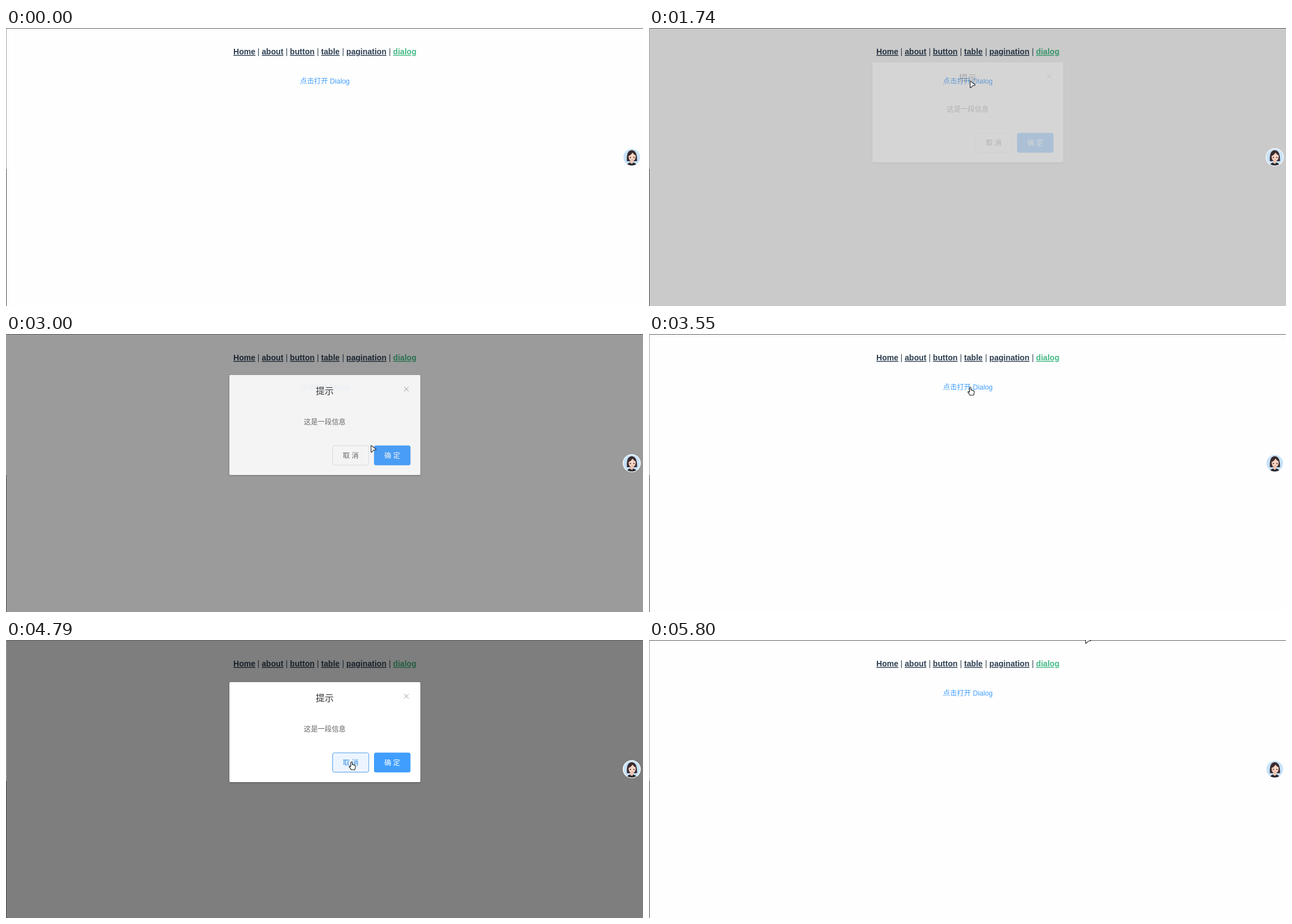
Animation, 1132 px wide and 495 px high, one loop 5900 ms. Source, as an HTML page:

```html
<!DOCTYPE html>
<html lang="zh-CN">
<head>
<meta charset="utf-8">
<title>Dialog</title>
<style>
  html, body { margin: 0; width: 100%; height: 100%; overflow: hidden; background: #fefefe; }
  svg { display: block; width: 1132px; height: 495px; }
  text { font: 12.4px "Liberation Sans", Arial, "Noto Sans CJK SC", "Noto Sans CJK", sans-serif; white-space: pre; }
  .nav text { font-size: 14.1px; fill: #2c3e50; }
  .nav .link { font-weight: bold; text-decoration: underline; }
  .nav .active { fill: #42b983; }
  .mid { text-anchor: middle; }
  .panel { fill: #fff; filter: drop-shadow(0 1px 1.4px rgba(0, 0, 0, .3)); }
  .cursor path { fill: #fff; stroke: #111; stroke-width: 1.1; stroke-linejoin: round; stroke-linecap: round; }
</style>
</head>
<body>
<svg viewBox="0 0 1132 495">
  <rect width="1132" height="495" fill="#fefefe"/>
  <g class="nav" id="nav"></g>
  <text x="522.6" y="99.2" fill="#409eff">点击打开 Dialog</text>

  <rect id="mask" width="1132" height="495" fill="#000" opacity="0"/>

  <g id="dialog" opacity="0">
    <rect class="panel" x="397" y="75" width="339.4" height="178" rx="1.8"/>
    <text class="mid" x="566.5" y="109" style="font-size:15.9px" fill="#303133">提示</text>
    <path d="M707.4 96.1l8.2 8.2m0-8.2l-8.2 8.2" stroke="#909399" stroke-width="1"/>
    <text class="mid" x="566.5" y="162.5" fill="#606266">这是一段信息</text>
    <rect id="cancel" x="580.5" y="200.9" width="64.2" height="34.4" rx="3.2"/>
    <text id="cancelText" class="mid" x="612.6" y="222.6">取 消</text>
    <rect id="confirm" x="654" y="200.5" width="64.8" height="35.2" rx="3.5"/>
    <text class="mid" x="686.4" y="222.6" fill="#fff" font-weight="500">确 定</text>
  </g>

  <g transform="translate(1112 230)">
    <clipPath id="round"><circle r="14.8"/></clipPath>
    <circle r="16" fill="#fff"/>
    <circle r="14.8" fill="#c6e2fa"/>
    <g clip-path="url(#round)">
      <path d="M-8.6 7Q-10-12 0-12.6Q10-12 9.4 7Q5 8 0 6Q-5 8-8.6 7Z" fill="#3b2b2d"/>
      <path d="M-9 16Q-8 10.500-2.500 9.500H2.500Q8 10.500 9 16Z" fill="#24242a"/>
      <path d="M-2.300 5H2.300V10.500Q0 13-2.300 10.500Z" fill="#f0bfa9"/>
      <path d="M-5.600-2Q-1-4 1.500-8Q4-4 7-3Q7.500 6.800.7 7Q-5.800 6.500-5.600-2Z" fill="#f9d5c4"/>
      <circle cx="-2.400" cy="0.600" r="1.100" fill="#3a2528"/>
      <circle cx="3.800" cy="0.600" r="1.100" fill="#3a2528"/>
      <path d="M-.4 4.400Q.8 5.200 2 4.400" fill="none" stroke="#d0655f" stroke-width=".9"/>
    </g>
  </g>

  <rect width="1132" height="1" fill="#5c5c5c"/>
  <rect width="1" height="251" fill="#a0a0a0"/>
  <rect y="251" width="1" height="244" fill="#444"/>

  <g class="cursor" id="cursor">
    <g id="arrow"><path d="M.7 1.400Q.7.2 1.700.9L9.200 6.900Q10 8 8.700 8.300L6.200 8.500Q5.200 8.700 4.500 9.600L2.300 12Q.9 13 .7 11.600Z"/></g>
    <g id="hand"><path d="M-1.400 8.500V1.200Q-1.300 0 0 0Q1.200 0 1.300 1.200V5Q2.500 4.300 3.300 5.300Q4.600 4.800 5.200 6Q6.900 5.800 6.900 7.500V10Q6.800 12 5.500 14H-.6Q-1.600 12-3.900 9.200Q-4.600 7.700-3.300 7.500Q-2.300 7.500-1.400 8.500Z"/></g>
    <g id="beam"><path d="M-2-5H2M0-5V5M-2 5H2" style="fill:none;stroke:#222;stroke-width:1"/></g>
  </g>
</svg>
<script>
const LOOP = 5900;
const $ = id => document.getElementById(id);
const set = (id, attrs) => {
  for (const k in attrs) $(id).setAttribute(k, attrs[k]);
};

const links = [["Home", 404], ["about", 454.5], ["button", 504.6], ["table", 560], ["pagination", 604.8], ["dialog", 687.8]];
const bars = [448.7, 498.8, 554.4, 599, 682];
$("nav").innerHTML =
  links.map(([name, x]) => `<text class="link${name === "dialog" ? " active" : ""}" x="${x}" y="47">${name}</text>`).join("") +
  bars.map(x => `<text class="mid" x="${x}" y="47">|</text>`).join("");

// Screen refreshes: first time, last time, count
const ticks = [0];
[[50, 620, 7], [710, 1270, 7], [1640, 1640, 1], [1740, 2150, 6], [2260, 2620, 5],
 [2900, 2900, 1], [3000, 3470, 6], [3700, 3980, 4], [4070, 4260, 3],
 [4360, 4790, 6], [4870, 4870, 1], [4980, 5540, 7], [5620, 5620, 1], [5800, 5800, 1]]
  .forEach(([from, to, n]) => {
    for (let i = 0; i < n; i++) ticks.push(n > 1 ? from + (to - from) * i / (n - 1) : from);
  });
const hold = t => ticks.reduce((last, tick) => tick <= t + .01 ? tick : last, 0);

// Pointer: time, x, y, shape
const route = [
  [0, 761, -20, "arrow"], [50, 761, -5, "arrow"], [330, 738, 20, "arrow"], [600, 705, 39, "hand"],
  [800, 677, 53, "arrow"], [1100, 592, 90, "hand"], [1270, 570, 94, "hand"], [1690, 570, 94, "arrow"],
  [1740, 570, 94, "arrow"], [2150, 630, 152, "arrow"], [2430, 677, 211, "hand"], [2620, 690, 226, "hand"],
  [2900, 690, 226, "hand"], [3000, 648, 198, "arrow"], [3300, 586, 112, "arrow"], [3340, 580, 103, "hand"],
  [3470, 571, 95, "hand"], [3980, 571, 95, "hand"], [4070, 571.5, 110.5, "beam"], [4150, 573, 118, "arrow"],
  [4550, 607, 204, "hand"], [4700, 614, 217, "hand"], [4835, 614, 217, "hand"], [4870, 617, 211, "hand"],
  [4960, 638, 178, "arrow"], [5250, 716, 71, "arrow"], [5540, 772.5, -3, "arrow"], [5620, 775, -6.5, "arrow"],
  [LOOP, 775, -6.5, "arrow"]
];

function pointer(t) {
  const i = Math.max(0, route.findIndex(k => k[0] > t) - 1);
  const [t0, x0, y0, shape] = route[i], [t1, x1, y1] = route[i + 1];
  const p = (t - t0) / (t1 - t0);
  return { x: x0 + (x1 - x0) * p, y: y0 + (y1 - y0) * p, shape };
}

// CSS "ease": cubic-bezier(.25, .1, .25, 1)
function ease(p) {
  if (p <= 0) return 0;
  if (p >= 1) return 1;
  const curve = (a, b, s) => 3 * a * s * (1 - s) ** 2 + 3 * b * s * s * (1 - s) + s ** 3;
  let lo = 0, hi = 1;
  for (let i = 0; i < 24; i++) {
    const s = (lo + hi) / 2;
    if (curve(.25, .25, s) < p) lo = s; else hi = s;
  }
  return curve(.1, 1, lo);
}

const visits = [[1690, 2967], [4020, 4836]];
function shown(t, ms) {
  const visit = visits.find(v => t >= v[0] && t < v[1] + 310);
  if (!visit) return 0;
  return t < visit[1] ? ease((t - visit[0]) / ms) : 1 - ease((t - visit[1]) / ms);
}

function draw(now) {
  const t = hold(now % LOOP);
  const p = shown(t, 300);
  set("mask", { opacity: shown(t, 200) * .5 });
  set("dialog", { opacity: p, transform: `translate(0 ${-17.66 * (1 - p)})` });

  const over = t >= 4550 && t < 5200, press = t >= 4780 && over;
  const blue = press ? "#3a8ee6" : "#409eff";
  set("cancel", { fill: over ? "#ecf5ff" : "#fff", stroke: press ? blue : over ? "#c6e2ff" : "#dcdfe6", "stroke-width": .9 });
  set("cancelText", { fill: over ? blue : "#606266" });
  set("confirm", { fill: t >= 2400 && t < 2950 ? "#66b1ff" : "#409eff" });

  const c = pointer(t);
  set("cursor", { transform: `translate(${c.x} ${c.y})` });
  for (const id of ["arrow", "hand", "beam"]) $(id).style.display = id === c.shape ? "" : "none";
}

const start = performance.now();
function tick() {
  draw(performance.now() - start);
  requestAnimationFrame(tick);
}
tick();
</script>
</body>
</html>
```
